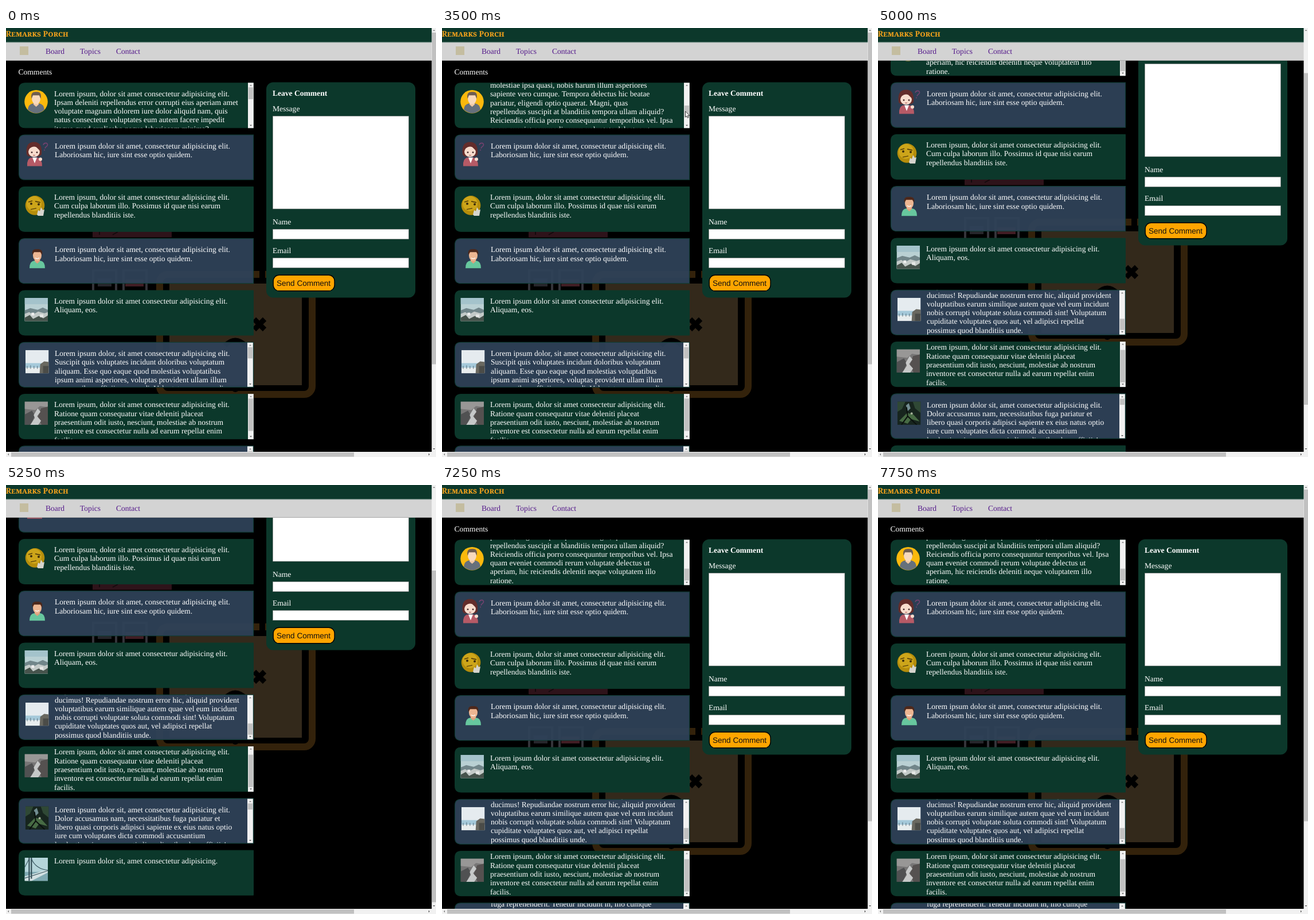
These frames come from a looping animation (750x747 px, 8 s). An HTML page:

```html
<!DOCTYPE html>
<html lang="en">
<head>
<meta charset="utf-8">
<title>Remarks Porch</title>
<style>
html, body { margin: 0; width: 100%; height: 100%; overflow: hidden; background: #000; }
svg { display: block; }
text { font: 13.56px "Liberation Serif", "Times New Roman", serif; fill: #fff; text-rendering: geometricPrecision; white-space: pre; }
.title { font: bold 13.6px "Noto Serif", serif; font-variant: small-caps; fill: #f0a01c; }
.link { fill: #551a8b; }
.bold { font-weight: bold; }
.button { font-family: "Liberation Sans", Arial, sans-serif; fill: #111; }
.tip { font: 7.15px "Open Sans", sans-serif; fill: #777; }
.tip.tag { font-weight: bold; fill: #3c2a7d; }
</style>
</head>
<body>
<svg id="stage" width="750" height="747" viewBox="0 0 750 747"></svg>
<script>
const GREEN = '#0c382b', BLUE = '#2f4259', LINE = 15.3, STEP = 250, LOOP = 8000;
const rect = (x, y, w, h, fill, more = '') =>
  `<rect x="${x}" y="${y}" width="${w}" height="${h}" fill="${fill}" ${more}/>`;
const circle = (x, y, r, fill) => `<circle cx="${x}" cy="${y}" r="${r}" fill="${fill}"/>`;
const path = (d, fill, more = '') => `<path d="${d}" fill="${fill}" ${more}/>`;
const stroke = (d, color, width) => path(d, 'none', `stroke="${color}" stroke-width="${width}"`);
const text = (x, y, s, cls = '', more = '') => `<text x="${x}" y="${y}" class="${cls}" ${more}>${s}</text>`;

const photo = (x, y, sky, shapes) =>
  `<svg x="${x}" y="${y}" width="40.5" height="40.5" viewBox="0 0 41 41">${rect(0, 0, 41, 41, sky)}${shapes}</svg>`;

const first = `Lorem ipsum, dolor sit amet consectetur adipisicing elit.
Ipsam deleniti repellendus error corrupti eius aperiam amet
voluptate magnam dolorem iure dolor aliquid nam, quis
natus consectetur voluptates eum autem facere impedit
itaque quod explicabo neque laboriosam minima?
Quisquam dolores sequi tempore nulla, quidem odio
veritatis ab fugit maxime rerum sint. Placeat enim
molestiae ipsa quasi, nobis harum illum asperiores
sapiente vero cumque. Tempora delectus hic beatae
pariatur, eligendi optio quaerat. Magni, quas
repellendus suscipit at blanditiis tempora ullam aliquid?
Reiciendis officia porro consequuntur temporibus vel. Ipsa
quam eveniet commodi rerum voluptate delectus ut
aperiam, hic reiciendis deleniti neque voluptatem illo
ratione.`.split('\n');

const sixth = `Lorem ipsum dolor, sit amet consectetur adipisicing elit.
Suscipit quis voluptates incidunt doloribus voluptatum
aliquam. Esse quo eaque quod molestias voluptatibus
ipsum animi asperiores, voluptas provident ullam illum
nemo quibus officiis commodi. Voluptatem quos modi
dignissimos saepe earum, minus expedita nihil quae
laborum fugiat. Debitis architecto nisi tenetur ad
perspiciatis, similique odit at harum veniam ipsam
cumque eos. Itaque dolorum sunt iusto repudiandae
culpa, facilis quidem in molestiae nam sequi
ducimus! Repudiandae nostrum error hic, aliquid provident
voluptatibus earum similique autem quae vel eum incidunt
nobis corrupti voluptate soluta commodi sint! Voluptatum
cupiditate voluptates quos aut, vel adipisci repellat
possimus quod blanditiis unde.`.split('\n');

const eighth = `Lorem ipsum dolor sit, amet consectetur adipisicing elit.
Dolor accusamus nam, necessitatibus fuga pariatur et
libero quasi corporis adipisci sapiente ex eius natus optio
iure cum voluptates dicta commodi accusantium
laudantium ipsum corrupti eligendi quibusdam officiis!`.split('\n')
  .concat(first.slice(5, 14), sixth.slice(4, 12),
    'fuga reprehenderit. Tenetur incidunt in, illo cumque', sixth.slice(10));

const asked = ['Lorem ipsum dolor sit amet, consectetur adipisicing elit.', 'Laboriosam hic, iure sint esse optio quidem.'];

// Each card: avatar, lines and, where it scrolls, its scroll range and motion keys.
const cards = [
  { lines: first, max: 162, keys: [[2750, 0], [3750, 162]],
    art: circle(30.5, 33, 20.3, '#fbb90d') +
      path('M16 47Q17 37 26 36L30.5 41 35 36Q44 37 45 47Q31 59 16 47', '#66707c') +
      path('M26 32H35V38L30.5 42 26 38Z', '#f0c8a6') +
      `<ellipse cx="30.5" cy="28" rx="7.4" ry="9.5" fill="#f7d9bd"/>` +
      path('M22.5 28Q20 15 31 16Q41 15 38.5 28L36 22 25 22Z', '#6f5d50') },
  { lines: asked,
    art: path('M15 55Q14 42 22 40H33Q41 42 41 55Z', '#b65a66') + path('M24 40H32L28 50Z', '#fff') +
      path('M14 35Q11 13 27 13Q42 13 40 35L36 38H17Z', '#642d2b') +
      `<ellipse cx="27" cy="30" rx="10" ry="9" fill="#f8dccd"/>` +
      path('M17 28Q19 20 29 20Q34 25 37 28Q36 18 27 17Q17 18 17 28', '#642d2b') +
      circle(23, 31, 1.4, '#402525') + circle(32, 31, 1.4, '#402525') + stroke('M25 36H29', '#a04c4c', 1) +
      circle(38, 43, 3, '#f8dccd') +
      stroke('M43 18Q44 14 49 15Q53 18 47 22L46 24', '#75426f', 1.6) + circle(45, 27, 1, '#75426f') },
  { lines: ['Lorem ipsum, dolor sit amet consectetur adipisicing elit.', 'Cum culpa laborum illo. Possimus id quae nisi earum', 'repellendus blanditiis iste.'],
    art: circle(28.5, 33, 16.8, '#b58d0b') + circle(27, 30, 13, '#cda51a') +
      stroke('M17 27L24 25M29 26L38 28', '#57400a', 1.6) +
      circle(22, 30, 2, '#3c2d0b') + circle(35, 31, 2, '#3c2d0b') + stroke('M21 40L31 38', '#57400a', 1.4) +
      path('M32 49L34 41 37 43 39 36 42 41 45 40 43 51 34 51Z', '#d6d4cd') },
  { lines: asked,
    art: path('M19 52Q19 40 27 39H38Q46 40 46 52Z', '#67c79e') + path('M28 37H37V40L32.5 44 28 40Z', '#dfa17e') +
      `<ellipse cx="32.5" cy="30" rx="7.5" ry="9.5" fill="#edb692"/>` +
      path('M24 29Q22 18 32 19Q43 18 41 29L38 24H27Z', '#4d281b') + stroke('M29 34Q32 37 36 34', '#fff', 1.3) },
  { lines: ['Lorem ipsum dolor sit amet consectetur adipisicing elit.', 'Aliquam, eos.'],
    art: photo(10.5, 13.5, '#b9d0d3', rect(0, 0, 41, 11, '#a4c3cb') +
      path('M0 22L10 18 23 21 32 17 41 21V41H0Z', '#71868a') +
      path('M0 28L8 25 15 29 24 24 35 27 41 25V41H0Z', '#c3cac8') +
      path('M0 35L9 30 15 37 25 32 33 36 41 31V41H0Z', '#46534c') +
      rect(12, 26, 5, 5, '#eee') + rect(27, 29, 6, 5, '#e5e7e5')) },
  { lines: sixth, max: 163.4, keys: [[4000, 0], [4500, 163.4]],
    art: photo(12, 14, '#e5ebef', rect(0, 23, 30, 9, '#a5c9da') + rect(0, 31, 41, 10, '#e8edee') +
      path('M25 41L26 25 33 20 41 21V41Z', '#696860') + path('M31 41V28H41V41Z', '#4b4c48') +
      stroke('M3 28V33M9 27V33M15 28V33M21 28V33', '#536974', 1)) },
  { lines: ['Lorem ipsum, dolor sit amet consectetur adipisicing elit.', 'Ratione quam consequatur vitae deleniti placeat', 'praesentium odit iusto, nesciunt, molestiae ab nostrum', 'inventore est consectetur nulla ad earum repellat enim', 'facilis.'],
    max: 9, keys: [[4500, 0], [4750, 9]],
    art: photo(10.5, 13.3, '#777676', path('M0 0H41V10L27 8 19 15 0 13Z', '#989796') +
      path('M0 23L13 16 18 25 11 41H0Z', '#505152') + path('M29 12L41 9V41H30L23 28Z', '#555150') +
      path('M23 12L28 18 22 26 29 34 24 41H10L18 29 16 24Z', '#c6c8c8')) },
  { lines: eighth, max: 361, keys: [[5250, 0], [5750, 354.5]],
    art: photo(12, 14, '#17251e', path('M0 0H14L8 13 0 18ZM27 0H41V20L31 12Z', '#2f4835') +
      path('M3 34L17 20 28 23 39 35 24 31 18 39Z', '#476b44') + path('M15 7L20 3 23 12 18 17Z', '#728d91') +
      stroke('M7 41L18 26 34 41M18 26L16 10', '#0a100d', 2) + circle(25, 21, 2, '#a6b39a')) },
  { lines: ['Lorem ipsum dolor sit, amet consectetur adipisicing.'],
    art: photo(10.5, 13.3, '#b5d5da', rect(0, 25, 41, 16, '#7faab2') + path('M0 33L41 21V26L12 41H0Z', '#d3e1e2') +
      stroke('M8 0V41M12 0V37', '#29434b', 2) + stroke('M12 2Q20 20 41 22M8 2L0 17M0 36L41 23', '#3b5962', 1.2)) }
];

const arrow = (x, y, dir, color) => path(`M${x - 2} ${y + dir}h4l-2 ${-2 * dir}z`, color);

cards.forEach((c, i) => {
  const blue = i % 2;
  c.inset = blue ? 1 : 0;
  c.view = 79 - 2 * c.inset;
  c.track = c.view - 16;
  c.thumb = c.track * c.view / (c.view + c.max);
});

function card(c, i) {
  const blue = i % 2, b = c.inset, x = 400 - b;
  const shape = 'M11 .5H409.5V78.5H11Q.5 78.5 .5 68V11Q.5 .5 11 .5Z';
  const lines = c.lines.map((s, n) => text(62 + b, 23.3 + b * .9 + n * LINE, s)).join('');
  const bar = c.max ? rect(x, b, 9.8, c.view, '#f1f1f1') +
    arrow(x + 5, b + 4.5, 1, '#777') + arrow(x + 5, b + c.view - 4.5, -1, '#505050') +
    rect(x + .8, 0, 8.2, c.thumb, '#c1c1c1', `id="thumb${i}"`) : '';
  return `<g transform="translate(22 ${95.3 + i * 90.3})">` +
    (blue ? path(shape, BLUE, `fill-opacity=".94" stroke="#123d38" stroke-width="1.2"`) : path(shape, GREEN, `stroke="${GREEN}"`)) +
    c.art + `<svg y="${b}" width="410" height="${c.view}"><g id="lines${i}"><g transform="translate(0 ${-b})">${lines}</g></g></svg>${bar}</g>`;
}

const backdrop =
  rect(151, 345, 138, 19.5, '#2e131a') + stroke('M163 352V360M186 360L195 355', '#140a0d', 2) +
  stroke('M152 462V422H192V462M205 462V422H245V462', '#34343a', 4) + rect(208, 438, 32, 12, '#411d24') + rect(160, 436, 24, 14, '#26262b') +
  rect(268, 429, 266, 209, 'none', 'rx="14" stroke="#33220b" stroke-width="12"') +
  rect(442, 420, 10, 18, '#000') + rect(285, 445, 231, 177, '#33291b') +
  stroke('M433 507L451 525M451 507L433 525', '#000', 9) + stroke('M382 553Q400 534 418 553', '#000', 8) +
  circle(400, 628, 6, '#000');

const form = rect(454, 94.5, 260, 375, GREEN, 'rx="12"') +
  text(465, 118, 'Leave Comment', 'bold') + text(465, 145, 'Message') +
  text(465, 342, 'Name') + text(465, 392, 'Email') +
  [[153.3, 161.7], [350.3, 17.4], [400.3, 17.4]].map(([y, h]) =>
    rect(465.3, y, 237, h, '#fff', 'stroke="#767676" stroke-width=".6"')).join('') +
  rect(466.2, 430.3, 106.8, 27.5, '#ffa500', 'rx="10" stroke="#000" stroke-width="1.4"') +
  text(472, 448.6, 'Send Comment', 'button');

const links = [['Board', 69, 33], ['Topics', 129, 37], ['Contact', 192, 42]];
const header = rect(0, 0, 743, 25, GREEN) + text(-.5, 15.3, 'Remarks Porch', 'title') +
  rect(0, 25, 743, 32, '#d3d3d3') + rect(0, 24, 743, 1.3, '#52736a') + rect(0, 56, 743, 1, '#a9a9a9') +
  rect(24, 32, 15, 15, '#c4bda0') +
  links.map(([s, x], i) => text(x, 45, s, 'link', `id="link${i}"`)).join('');

const pageBars = rect(0, 738, 743, 9, '#f1f1f1') + rect(9, 739, 598, 7.5, '#c1c1c1') +
  path('M5 740.5v4l-2-2z', '#777') + path('M737 740.5v4l2-2z', '#505050') +
  rect(742.5, 0, 7.5, 747, '#f1f1f1') + arrow(746.5, 4, 1, '#777') + arrow(746.5, 733, -1, '#505050') +
  rect(743, 0, 7, 577.5, '#c1c1c1', 'id="pageThumb"');

const pointers =
  path('M0 0V10L2.3 8 4 11.6 5.6 10.8 4 7.4H7Z', '#fff', 'id="arrow" stroke="#000" stroke-width=".7"') +
  path('M-1 1Q0-1 1 1V4.5L5 6V9L4 12H-1L-4 7.5Q-3.5 6-1 8Z', '#fff', 'id="hand" stroke="#000" stroke-width=".7"');

const inspect = `<g id="inspect">${rect(0, 0, 742.5, 747, '#6fa8dc', 'fill-opacity=".66"')}` +
  rect(-2, 730, 96, 19, '#fff', 'rx="2" stroke="#9aa7b5" stroke-width=".6"') +
  text(5, 741.8, 'html', 'tip tag') + text(28.5, 741.8, '1261.33 × 1567.89', 'tip') + '</g>';

const $ = id => document.getElementById(id);
$('stage').innerHTML = rect(0, 0, 750, 747, '#000') +
  `<g id="page">${backdrop}${text(21.5, 81, 'Comments')}${cards.map(card).join('')}${form}</g>` +
  header + pageBars + pointers + inspect;

const pageKeys = [[4750, 0], [5250, 182], [5750, 182], [6250, 0]];
// time, x, y, pointer; a bare time hides the pointer
const pointerKeys = [
  [0], [250, 424.5, 345.5, 'arrow'], [500, 435, 313.5, 'arrow'], [1000, 310, 200, 'arrow'],
  [1250, 150, 95, 'arrow'], [1500, 58.5, 46, 'arrow'], [1750, 84, 41, 'hand'], [2000, 113, 43, 'arrow'],
  [2250, 157.5, 45.5, 'hand'], [2500, 212, 41, 'hand'], [2750, 335, 90, 'arrow'], [3000, 424, 124, 'arrow'],
  [3250, 424, 135, 'arrow'], [3500, 424.5, 145, 'arrow'], [3750, 424.5, 156, 'arrow'],
  [4000, 424, 567, 'arrow'], [4250, 424, 588, 'arrow'], [4500, 424, 628, 'arrow'], [4750],
  [5500, 424, 585, 'arrow'], [5750, 424, 611, 'arrow'], [6000], [6250, 484.5, 490.5, 'arrow'],
  [6500, 545, 548, 'arrow'], [6750, 625, 625, 'arrow'], [7000, 690, 705, 'arrow'], [7250]
];

function valueAt(keys, t) {
  const n = keys.findIndex(k => k[0] > t);
  if (n < 0) return keys[keys.length - 1][1];
  if (!n) return keys[0][1];
  const [t0, a] = keys[n - 1], [t1, b] = keys[n];
  return a + (b - a) * (t - t0) / (t1 - t0);
}

const move = (id, x, y) => $(id).setAttribute('transform', `translate(${x} ${y})`);
const show = (id, on) => $(id).setAttribute('display', on ? 'inline' : 'none');

function draw(now) {
  const t = Math.floor(now % LOOP / STEP) * STEP;
  const scroll = valueAt(pageKeys, t);
  move('page', 0, -scroll);
  move('pageThumb', 0, 8 + scroll * 141 / 182);

  cards.forEach((c, i) => {
    if (!c.max) return;
    const s = valueAt(c.keys, t);
    move('lines' + i, 0, -s);
    move('thumb' + i, 0, c.inset + 8 + (c.track - c.thumb) * s / c.max);
  });

  const [, x, y, kind] = pointerKeys.filter(k => k[0] <= t).pop();
  for (const id of ['arrow', 'hand']) {
    show(id, id === kind);
    if (id === kind) move(id, x, y);
  }
  links.forEach(([, left, w], i) => {
    const over = kind === 'hand' && x >= left && x <= left + w;
    $('link' + i).style.textDecoration = over ? 'underline' : 'none';
  });
  show('inspect', t === 7500);
  requestAnimationFrame(() => draw(performance.now()));
}
draw(0);
</script>
</body>
</html>
```
